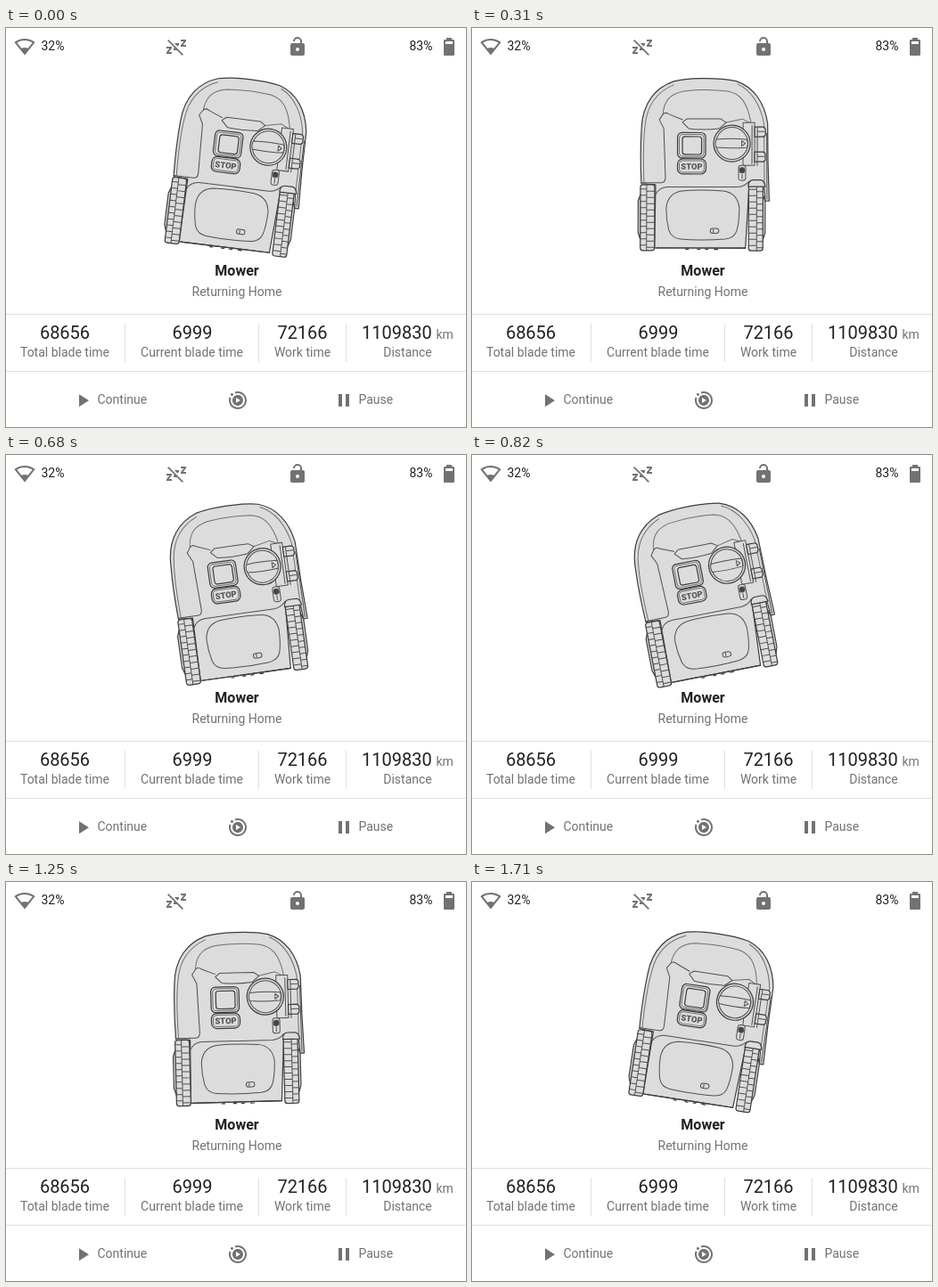
Recreate the animation shown at these times as an HTML page. Size 516 px wide and 448 px high, loop 1800 ms.

```html
<!DOCTYPE html>
<html lang="en">
<head>
<meta charset="utf-8">
<title>Mower card</title>
<style>
  html, body { margin: 0; width: 100%; height: 100%; overflow: hidden; background: #fff; }
  svg { display: block; width: 516px; height: 448px; }
  text { font-family: Roboto, Arial, sans-serif; font-size: 14px; fill: #727272; }
  .mid { text-anchor: middle; }
  .dark { fill: #212121; }
  .value { font-size: 20px; fill: #212121; }
  .title { font-size: 16px; font-weight: 700; fill: #212121; }
  .stop { font-size: 9.4px; font-weight: 900; fill: #555; }
  .icons { fill: #727272; }
  .rules { stroke: #e0e0e0; fill: none; }
  #mower { fill: #dcdcdc; stroke: #505050; stroke-width: 1; stroke-linejoin: round; stroke-linecap: round; }
  #mower .stop { stroke: none; }
  .line { fill: none; }
  .bold { stroke: #3c3c3c; stroke-width: 1.2; }
  .soft { stroke: #707070; }
  .solid { fill: #444; }
</style>
</head>
<body>
<svg viewBox="0 0 516 448" xmlns="http://www.w3.org/2000/svg">
  <g class="icons">
    <path transform="translate(9 9)" d="M12,3C7.79,3 3.7,4.41 .38,7C4.41,12.06 7.89,16.37 12,21.5C16.08,16.42 20.24,11.24 23.65,7C20.32,4.41 16.22,3 12,3M12,5C15.07,5 18.09,5.86 20.71,7.45L15.61,13.81C14.5,13.28 13.25,13 12,13C10.75,13 9.5,13.28 8.39,13.8L3.29,7.44C5.91,5.85 8.93,5 12,5Z"/>
    <path transform="translate(179 9)" d="M2,5.27L3.28,4L20,20.72L18.73,22L12.73,16H9V14.31L9.83,13.1L2,5.27M23,12H17V10.31L20.39,6H17V4H23V5.69L19.62,10H23V12M9.82,8H15V9.69L13.54,11.72L9.82,8M7,20H1V18.31L4.39,14H1V12H7V13.69L3.62,18H7V20Z"/>
    <path transform="translate(315 9)" d="M18,8A2,2 0 0,1 20,10V20A2,2 0 0,1 18,22H6C4.89,22 4,21.1 4,20V10A2,2 0 0,1 6,8H15V6A3,3 0 0,0 9,6H7A5,5 0 0,1 17,6V8H18M12,17A2,2 0 0,0 12,13A2,2 0 0,0 12,17Z"/>
    <path transform="translate(485 9)" d="M16,9H8V6H16M16.67,4H15V2H9V4H7.33A1.33,1.33 0 0,0 6,5.33V20.67C6,21.4 6.6,22 7.33,22H16.67A1.33,1.33 0 0,0 18,20.67V5.33C18,4.6 17.4,4 16.67,4Z"/>
    <path transform="translate(74 406)" d="M8,5.14V19.14L19,12.14Z"/>
    <path transform="translate(248 406)" d="M22 12C22 6.46 17.54 2 12 2C10.83 2 9.7 2.19 8.62 2.56L9.32 4.5C10.17 4.16 11.06 3.97 12 3.97C16.41 3.97 20.03 7.59 20.03 12S16.41 20.03 12 20.03S3.97 16.41 3.97 12C3.97 11.06 4.16 10.12 4.5 9.28L2.56 8.62C2.19 9.7 2 10.83 2 12C2 17.54 6.46 22 12 22S22 17.54 22 12M5.47 7C4.68 7 3.97 6.32 3.97 5.47S4.68 3.97 5.47 3.97S7 4.68 7 5.47S6.32 7 5.47 7M6 12C6 15.3 8.7 18 12 18S18 15.3 18 12S15.3 6 12 6S6 8.7 6 12M10 9L15 12L10 15Z"/>
    <path transform="translate(367 406)" d="M14,19H18V5H14ZM6,19H10V5H6Z"/>
  </g>

  <text class="dark" x="39.5" y="25">32%</text>
  <text class="dark" x="452.5" y="25">83%</text>
  <text class="title mid" x="259" y="278">Mower</text>
  <text class="mid" x="259" y="301">Returning Home</text>

  <path class="rules" d="M0 321.5H516M0 385.5H516M133.5 332V375M283.5 332V375M381.5 332V375"/>
  <text class="value mid" x="66" y="349">68656</text>
  <text class="value mid" x="209" y="349">6999</text>
  <text class="value mid" x="332.5" y="349">72166</text>
  <text class="value" x="399" y="349">1109830</text>
  <text x="482.5" y="349">km</text>
  <text class="mid" x="66" y="369">Total blade time</text>
  <text class="mid" x="208.5" y="369">Current blade time</text>
  <text class="mid" x="332.5" y="369">Work time</text>
  <text class="mid" x="450.5" y="369">Distance</text>
  <text x="102.5" y="422">Continue</text>
  <text x="395.5" y="422">Pause</text>

  <g id="mower">
    <!-- shell -->
    <path class="bold" d="M205 247L206 176L190 175C189 155 189 130 190 113C191 84 206 67 226 60C244 55.500 278 55.500 296 59.500C316 66 328 84 331.500 107L332 150L333.500 194H329L328 180L311 176L307 247Z"/>
    <path class="line soft" d="M193 174C192 150 192 125 194 110C196 87 207 72 226 64M298 63C314 70 324 88 327.500 108L328 180"/>
    <path class="line" d="M330.500 118L331 192"/>
    <path class="line soft" d="M214 97C215 82 222 74 237 71C254 69 272 69 287 71C301 74 307 83 311 98L313 107"/>
    <path class="line" d="M190 174H212Q217 174 217 168L215 113L210 103L214 97Q217 94 221 97L236 103"/>
    <path class="line soft" d="M285 106L303 102L313 107"/>
    <path class="line" d="M236 106L241 102H279L285 106L277 113Q260 115 243 113Z"/>
    <!-- lower hood -->
    <path class="line" d="M206 187Q210 179 219 178.500H298Q306 178 311 172"/>
    <path class="line" d="M218 203Q219 186 235 183Q258 181 282 183Q298 185 300 202Q300 218 297 228Q294 236 284 237Q258 239 234 237Q224 236 221 227Q218 215 218 203Z"/>
    <rect x="267.500" y="225" width="9.500" height="5.500" rx="2.700"/>
    <path class="line" d="M271 226V229.500"/>
    <path class="line bold" d="M207 247H307"/>
    <path class="line bold" d="M240 248.500h3M253 248.500h3M262 248.500h3M272 248.500h4"/>
    <!-- side block, tabs and latch -->
    <path d="M304 106H317V154H304Z"/>
    <path class="bold" d="M317 111H327L329 113V120L327 122H317ZM317 139H327L329 141V148L327 150H317Z"/>
    <path class="line" d="M320 111V154M314 109V152M320 116H328M320 144H328"/>
    <rect x="299" y="154" width="8" height="17" rx="3"/>
    <circle class="solid" cx="303" cy="159.500" r="3"/>
    <path class="line" d="M303 164V169"/>
    <!-- knob -->
    <circle class="bold" cx="291.500" cy="129.500" r="20.500"/>
    <circle class="line" cx="291.500" cy="129.500" r="18"/>
    <path d="M274 125Q290 123.500 308.500 125Q310 129.500 308.500 134Q290 135.500 274 134Q272 129.500 274 125Z"/>
    <path class="line" d="M302.500 126.500L306.500 129.500L302.500 132.500Z"/>
    <!-- stop button -->
    <rect class="bold" x="230.500" y="117.500" width="31.500" height="28.500" rx="5"/>
    <rect class="line soft" x="232.500" y="119.500" width="27.500" height="24.500" rx="4"/>
    <rect class="bold" x="236" y="122" width="21.500" height="20" rx="3"/>
    <rect class="bold" x="230.500" y="147" width="32" height="17" rx="6"/>
    <rect class="line soft" x="232.500" y="149" width="28" height="13" rx="4"/>
    <text class="stop mid" x="246.500" y="158.900">STOP</text>
    <g id="wheels"></g>
    <path class="bold" d="M310 178Q310 171 315 170.500H324Q328 171 329 178Z"/>
  </g>
</svg>
<script>
  const LOOP = 1800;
  // Moments at which the pose is refreshed.
  const TICKS = [0, 60, 150, 220, 310, 400, 460, 550, 620, 680, 750, 820, 880,
    970, 1040, 1130, 1190, 1250, 1340, 1430, 1490, 1560, 1650, 1710];
  const mower = document.getElementById('mower');

  // One wheel: hub on the outer side, two staggered tread columns.
  function wheel(x, hubX, bulge) {
    const top = 176, end = 250, split = x + (bulge < 0 ? 7 : 9);
    let grooves = `M${split} ${top}V${end}`;
    for (let y = top + 5; y < end - 1; y += 7) {
      grooves += `M${x} ${y}H${split}M${split} ${y + 2.5}H${x + 16}`;
    }
    return `<path class="bold" d="M${hubX} 186L${hubX + bulge} 194V230L${hubX} 239Z"/>
      <rect class="bold" x="${x}" y="${top}" width="16" height="${end - top}" rx="3"/>
      <path class="line" d="${grooves}"/>`;
  }
  document.getElementById('wheels').innerHTML =
    wheel(189, 189.5, -3) + wheel(310.5, 326, 3);

  // Linear swing between +SWING and -SWING degrees, one second each way.
  const SWING = 11, LEAD = 182;
  function angle(ms) {
    const phase = ((ms + LEAD) % 2000) / 1000;
    return SWING * (2 * Math.abs(1 - phase) - 1);
  }

  function draw(ms) {
    const t = ms % LOOP;
    const tick = TICKS.findLast(v => v <= t);
    mower.setAttribute('transform', `rotate(${angle(tick)} 258.5 155)`);
  }

  function frame() {
    draw(performance.now());
    requestAnimationFrame(frame);
  }
  frame();
</script>
</body>
</html>
```
